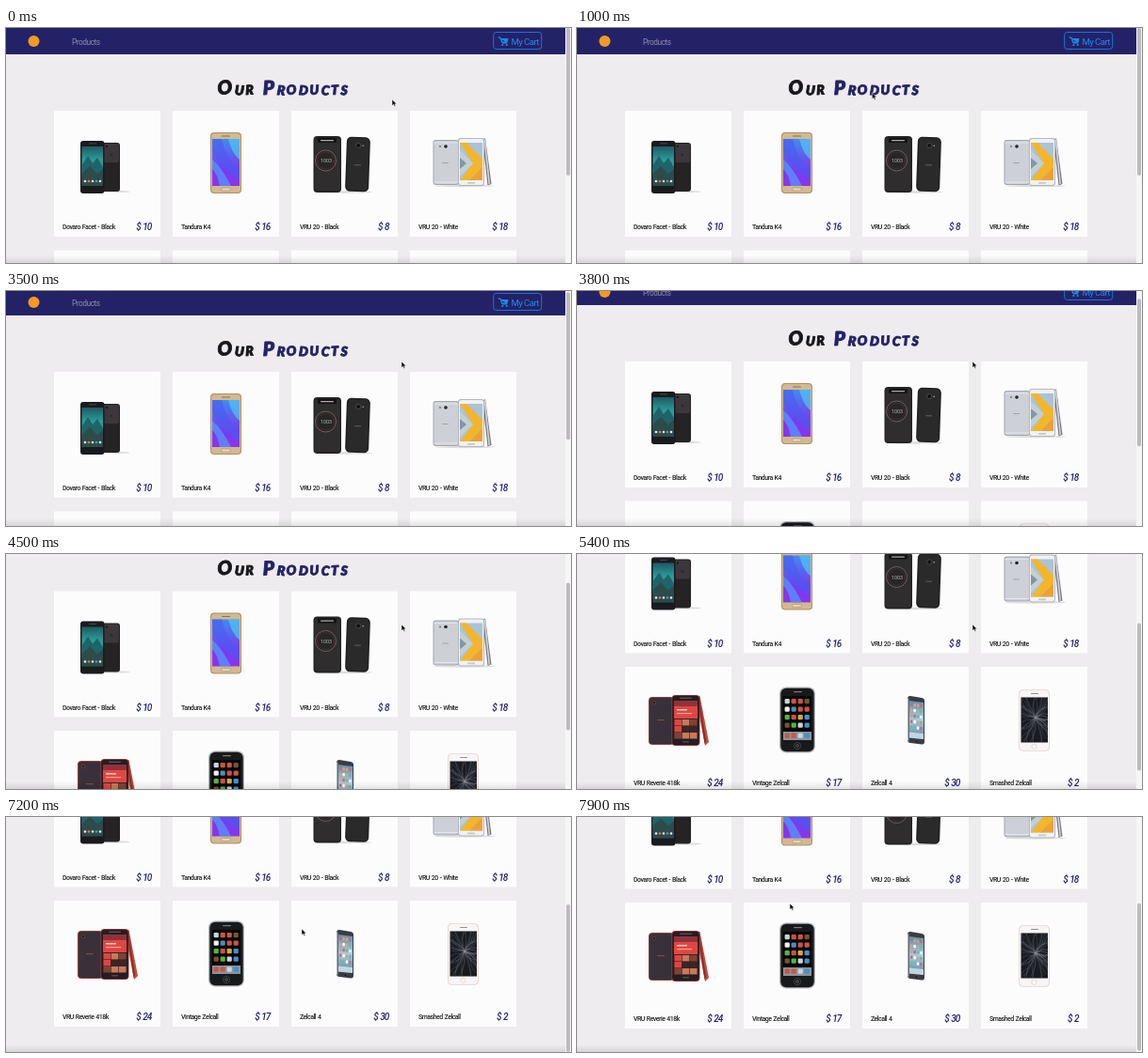
These frames come from a looping animation (600x250 px, 8 s). An HTML page:

```html
<!DOCTYPE html>
<html lang="en">
<head>
<meta charset="utf-8">
<title>Our Products</title>
<style>
html, body { margin: 0; width: 100%; height: 100%; overflow: hidden; background: #eeecee; }
svg { display: block; width: 600px; height: 250px; }
text { font-family: Roboto, "Liberation Sans", sans-serif; letter-spacing: -.06em; }
.title { font: 900 italic small-caps 20.5px Lato, sans-serif; letter-spacing: 2.1px; stroke-width: .8; stroke-linejoin: round; }
.label { font-size: 7px; font-weight: 500; letter-spacing: -.075em; word-spacing: .1em; fill: #222; }
.price { font-size: 10px; font-style: italic; font-weight: 500; letter-spacing: -.09em; word-spacing: .08em; fill: #24226a; text-anchor: end; }
</style>
</head>
<body>
<svg viewBox="0 0 600 250" id="stage"></svg>
<script>
const rect = (x, y, w, h, r, fill, extra = '') =>
  `<rect x="${x}" y="${y}" width="${w}" height="${h}" rx="${r}" fill="${fill}" ${extra}/>`;
const circle = (x, y, r, fill, extra = '') =>
  `<circle cx="${x}" cy="${y}" r="${r}" fill="${fill}" ${extra}/>`;
const path = (d, fill, extra = '') => `<path d="${d}" fill="${fill}" ${extra}/>`;
const text = (x, y, cls, str, extra = '') => `<text x="${x}" y="${y}" class="${cls}" ${extra}>${str}</text>`;
const line = (color, width) => `stroke="${color}" stroke-width="${width}"`;
const shadow = (x, y, w) => `<ellipse cx="${x}" cy="${y}" rx="${w}" ry="1.2" fill="#000" opacity=".12"/>`;
const gradient = (id, colors, dir = 'x2="0" y2="1"') =>
  `<linearGradient id="${id}" ${dir}>${colors.map((c, i) =>
    `<stop offset="${i / (colors.length - 1)}" stop-color="${c}"/>`).join('')}</linearGradient>`;

let seed = 7;
const random = () => (seed = seed * 16807 % 2147483647) / 2147483647;
const pick = list => list[random() * list.length | 0];

// Phones are drawn relative to the top left corner of their card.
function tealPhone() {
  return shadow(66, 86, 15) + rect(51, 34, 19, 52, 3, '#262325') + rect(52, 35, 17, 20, 2, '#3b373a') +
    circle(56, 38, 1, '#111') + circle(61, 47, 1.4, '#2d2a2d') +
    rect(28, 32, 25.5, 56, 3, '#1a1b1f') + rect(29.5, 38, 22.5, 42, 0, 'url(#teal)') +
    path('M29.5 58L36 48L41 56L46 50L52 60V68L29.5 70Z', '#1f6468') +
    path('M29.5 67L38 59L46 67L52 62V80H29.5Z', '#2d4b4b') +
    [33, 37, 41, 45, 49].map((x, i) => circle(x, 75, 1.3, ['#eee', '#d75', '#ddd', '#59a', '#eee'][i])).join('') +
    rect(37, 34.5, 8, .8, .4, '#55585c');
}
function goldPhone() {
  return rect(40, 23, 33, 65, 4, '#ae9068') + rect(41, 24, 31, 63, 3.5, '#d3b98f') +
    rect(42, 30, 29, 50, 0, 'url(#violet)') +
    path('M42 30H52Q56 50 71 62V74Q50 62 42 42Z', '#4a5af0', 'opacity=".6"') +
    path('M59 30H71V52Q63 46 59 30Z', '#55c4f5', 'opacity=".7"') +
    path('M42 52Q52 60 62 80H50Q48 68 42 62Z', '#4fa6fa', 'opacity=".65"') +
    rect(52, 26.5, 9, 1, .5, '#8c7350') + rect(51.5, 82, 10, 3.2, 1.6, '#e6d4b4', line('#9c8059', .5));
}
function blackPair() {
  return shadow(56, 86.5, 30) + rect(23.5, 27, 29.5, 60, 4, '#242325') + rect(25, 29, 26.5, 56, 3, '#2f2d2e') +
    rect(28, 29, 20, 5, 1, '#141415') + rect(31, 31, 14, 1.2, .5, '#aaa') +
    circle(36.5, 53, 11, '#272526', line('#7d6f6c', .8)) +
    circle(36.5, 53, 8.8, 'none', line('#70413f', .8) + ' stroke-dasharray="1 1"') +
    text(36.7, 55, '', '1003', 'font-size="6" fill="#a9a9a4" text-anchor="middle"') +
    `<g transform="rotate(2 70 57)">${rect(58, 28, 25, 58, 5, '#201f21')}
    ${rect(59.5, 29.5, 22, 55, 4, '#2b2a2b')}${circle(70.5, 37, 2.6, '#121214', line('#59575b', .7))}
    ${circle(75.5, 37, .8, '#aaa')}${rect(67, 57, 7, 1.3, .5, '#515053')}</g>`;
}
function silverTrio() {
  return shadow(58, 80, 32) + rect(24.5, 31, 27.5, 48, 3, '#a3a6ad') + rect(25.5, 32, 25.5, 46, 2.5, '#cdd0d7') +
    circle(38, 38, 2.3, '#25272c', line('#eceef1', .8)) + circle(32, 38, .9, '#666') + rect(34, 55, 7, 1, .5, '#a0a4ab') +
    path('M25.5 34H51M25.5 76H51', 'none', line('#edf0f3', .7)) +
    path('M77 31L80 29L86.5 78L82.5 79.5Z', '#77797f') + path('M78.5 31L80 30L85 78L83.5 78.5Z', '#d4d5d8') +
    rect(51, 29, 28, 51, 3, '#b4b7bd') + rect(52, 30, 26, 49, 2.5, '#f0f1f2') +
    rect(53, 34, 24, 40, 0, '#aac3d6') +
    path('M53 34H60L77 51V60L63 74H53L67 56Z', '#f3b62b') +
    path('M53 42L67 56L53 70Z', '#c3cfd6') + path('M53 50L60 56L53 62Z', '#8296a5') +
    path('M63 74L77 60V74Z', '#eaa238') + rect(61, 76, 8, 1.7, .8, '#c4c7cb');
}
function redTrio() {
  let tiles = '';
  for (let i = 0; i < 9; i++)
    tiles += rect(52.5 + i % 3 * 8.2, 56 + (i / 3 | 0) * 7, 7.6, 6.4, 0, pick(['#df4541', '#7c4336', '#3b2526', '#c9795a']));
  return path('M75 32L79.5 31L89 80L85 84Z', '#c8483a') + path('M77.5 33L79 32L86 79L84.5 82Z', '#7a3330') +
    rect(25, 32, 27, 51, 4, '#a8443b') + rect(25.7, 32.7, 25.6, 49.6, 3.5, '#38313a') +
    circle(31, 38, 1.6, '#18181a', line('#a6473d', .6)) + rect(34, 56, 8, 1.2, .5, '#7a4a48') +
    rect(49.5, 30, 30, 54, 4, '#a83c36') + rect(50.2, 30.7, 28.6, 52.6, 3.5, '#221e22') +
    rect(52, 36, 25, 41, 0, '#3a2328') + rect(52, 42, 25, 13, 0, '#e04742') +
    path('M52 36H77V42H52Z', '#93313a') + rect(55, 45, 11, 1.5, 0, '#f4c7c0') + rect(55, 49, 16, 1.2, 0, '#f0a39b') +
    tiles + rect(58, 32.8, 13, 1, .5, '#64646b') + rect(61, 79.5, 7, .8, .4, '#777');
}
function iconPhone() {
  const colors = ['#56b63c', '#f0f0ec', '#5688b9', '#d9a642', '#c6d5de', '#cd5442', '#77542f', '#438fd0'];
  const icon = (x, y) => rect(x, y, 5.2, 5.2, 1.2, pick(colors));
  let icons = '';
  for (let i = 0; i < 16; i++) icons += icon(43.6 + i % 4 * 7, 34 + (i / 4 | 0) * 8.5);
  return rect(38, 21.5, 38, 70, 7, '#b4b5b8') + rect(39.3, 22.8, 35.4, 67.4, 6, '#18191b') +
    rect(42, 31, 30, 47, 0, '#050506') + rect(42, 69, 30, 9, 0, '#8b949b') + icons +
    [0, 1, 2, 3].map(i => icon(43.6 + i * 7, 70.5)).join('') + rect(53, 26, 9, 1.2, .6, '#77797c') +
    circle(57, 84, 3.5, '#111', line('#66676a', .6)) + rect(55.8, 82.8, 2.4, 2.4, .5, 'none', line('#ccc', .4));
}
function slimPhone() {
  let icons = '';
  for (let i = 0; i < 20; i++)
    icons += rect(51 + i % 4 * 3.4, 38.5 + (i / 4 | 0) * 6 + i % 4 * .5, 2.4, 3.2, .5, pick(['#fff', '#e0a070', '#78b798', '#e8f2f8', '#c66b75']));
  return path('M48 34Q48 31 51 31L63 33Q66 33.5 66 36V80Q66 83 63 82.5L51 81Q48 80.5 48 78Z', '#3a3c42') +
    path('M48 34V78L49.4 80V33Z', '#a9abb0') + path('M50 36L65 38V77L50 75.5Z', 'url(#sky)') + icons +
    path('M50 69.5L65 71V77L50 75.5Z', '#c2d5df') + circle(57.5, 79.2, 1.3, '#111', line('#888', .3));
}
function crackedPhone() {
  let cracks = '';
  for (let i = 0; i < 60; i++) {
    let a = random() * 6.28, x = 58, y = 54;
    cracks += `M${x} ${y}`;
    for (let n = 0; n < 5; n++) {
      a += random() - .5;
      x += 5 * Math.cos(a);
      y += 6 * Math.sin(a);
      cracks += `L${x.toFixed(1)} ${y.toFixed(1)}`;
    }
  }
  return rect(40, 24, 33, 66, 5, '#dccabf') + rect(40.6, 24.6, 31.8, 64.8, 4.5, '#f7f5f5') +
    rect(42.5, 32.5, 28.5, 48, 0, '#191b20') +
    `<g clip-path="url(#glass)">${path(cracks, 'none', line('#8c9298', .22))}</g>` +
    rect(53, 28, 8, 1, .5, '#96918e') + circle(56.5, 84.9, 2.6, '#fafafa', line('#d5c3b8', .6));
}

const products = [
  ['Dovaro Facet - Black', 10, tealPhone], ['Tandura K4', 16, goldPhone],
  ['VRU 20 - Black', 8, blackPair], ['VRU 20 - White', 18, silverTrio],
  ['VRU Reverie 418k', 24, redTrio], ['Vintage Zelcall', 17, iconPhone],
  ['Zelcall 4', 30, slimPhone], ['Smashed Zelcall', 2, crackedPhone]
];

const cards = products.map(([name, price, draw], i) =>
  `<g transform="translate(${51 + i % 4 * 126} ${88 + (i / 4 | 0) * 148.5})">
    ${rect(0, 0, 113, 134, 0, '#fdfcfd')}${draw()}
    ${text(9, 126, 'label', name)}${text(103.5, 127.2, 'price', '$ ' + price)}</g>`).join('');

const nav = rect(0, 0, 594, 28, 0, '#242267') + circle(29.5, 14, 6, '#f19a24') +
  text(70, 17.7, '', 'Products', 'font-size="8.4" fill="#8b89ac"') +
  rect(517.7, 4.5, 51, 18, 3, 'none', line('#1d75d4', 1)) +
  path('M522.5 10H525L527 16H532.5M525.5 11.5H533L532 15H526.5Z', '#2188ec', line('#2188ec', 1)) +
  circle(527.3, 18, 1.1, '#2188ec') + circle(531.7, 18, 1.1, '#2188ec') +
  text(536.5, 18, '', 'My Cart', 'font-size="9.6" fill="#2188ec"');

const title = (x, str, color, tilt) =>
  text(x, 71, 'title', str, `fill="${color}" stroke="${color}" rotate="${tilt}"`);

const stage = document.getElementById('stage');
stage.innerHTML = `<defs>
  ${gradient('teal', ['#1f5a62', '#2b9a98', '#3aa39c', '#1c3c42'])}
  ${gradient('violet', ['#3f8df0', '#5c62ee', '#7a3af0', '#8a35ea'])}
  ${gradient('sky', ['#5f8fb0', '#a9cbdd', '#5a86a5'])}
  <linearGradient id="shade" x2="0" y2="1"><stop stop-opacity="0"/><stop offset="1" stop-opacity=".1"/></linearGradient>
  <clipPath id="glass">${rect(42.5, 32.5, 28.5, 48, 0, '#000')}</clipPath></defs>
  ${rect(0, 0, 600, 250, 0, '#eeecee')}
  <g id="page">${nav}
    ${title(225, 'Our', '#17171d', '-4 3 -3')}
    ${title(273, 'Products', '#242267', '-2 4 -4 3 -3 4 -2 3')}
    ${cards}</g>
  ${rect(0, 242, 594, 8, 0, 'url(#shade)')}
  ${rect(594, 0, 6, 250, 0, '#f7f6f7')}
  <g id="thumb">${rect(595, 0, 4, 157, 2, '#bcbabd')}</g>
  <g id="cursor">${path('M0 0V6.6L1.6 5.2L2.7 7.6L3.8 7.1L2.8 4.8H4.9Z', '#080808', line('#fff', .5))}</g>`;

// Keys: time, then values, joined by straight moves.
const scrollKeys = [[0, 0], [3400, 0], [3500, 2], [3800, 13], [4500, 48.5], [5400, 116.5], [5800, 138], [6200, 147.5], [7600, 147.5], [7900, 145.5], [8000, 145]];
const cursorKeys = [[0, 410, 76], [400, 400, 75], [1300, 270, 66], [2100, 159, 50], [2400, 170, 52], [3300, 420, 75], [6300, 420, 75], [7200, 314, 119], [7900, 226, 92], [8000, 220, 90]];
function at(keys, t) {
  const i = keys.findIndex(k => k[0] > t), a = keys[i - 1], b = keys[i];
  const u = (t - a[0]) / (b[0] - a[0]);
  return a.slice(1).map((v, n) => v + (b[n + 1] - v) * u);
}
const move = (id, x, y) => document.getElementById(id).setAttribute('transform', `translate(${x} ${y})`);

function frame(now) {
  const t = Math.floor(now % 8000 / 100) * 100;
  const [scroll] = at(scrollKeys, t);
  move('page', 0, -scroll);
  move('thumb', 0, scroll * .63);
  move('cursor', ...at(cursorKeys, t));
  requestAnimationFrame(frame);
}
frame(performance.now());
</script>
</body>
</html>
```
